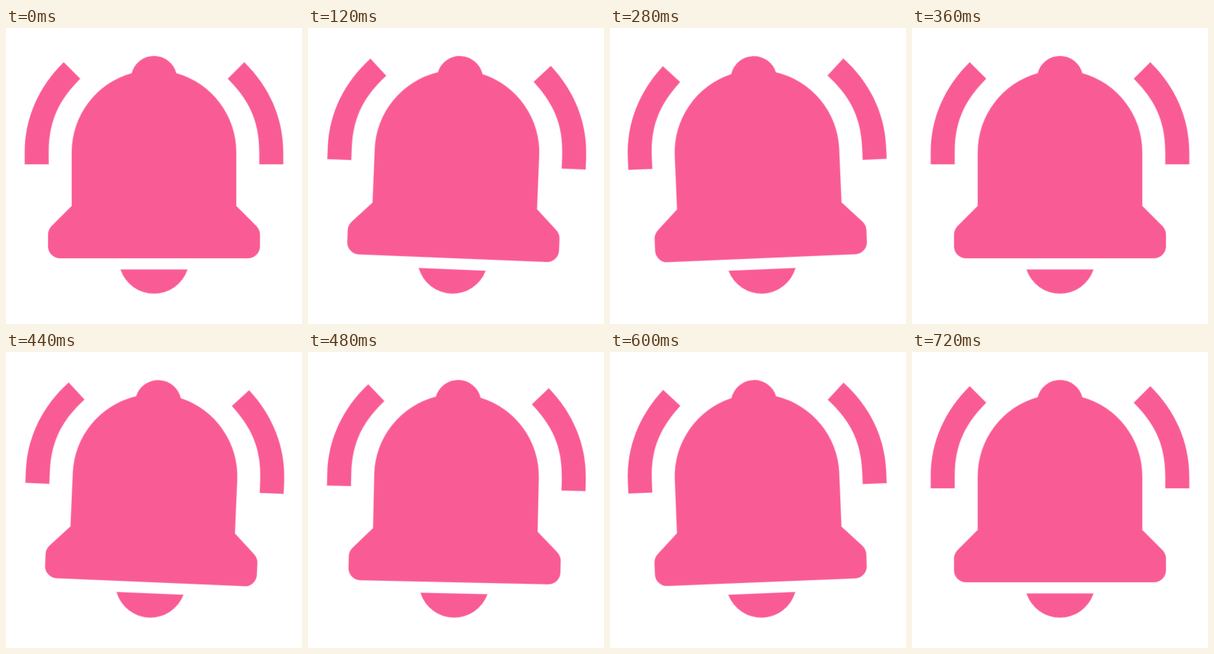
Animation, 400 px wide and 400 px high, one loop 1.76 s. Source, as an HTML page with a canvas:

```html
<!DOCTYPE html>
<html lang="en">
<head>
<meta charset="utf-8">
<title>Ringing bell</title>
<style>
  html, body { margin: 0; width: 100%; height: 100%; overflow: hidden; background: #fff; }
  canvas { display: block; width: 100vmin; height: 100vmin; }
</style>
</head>
<body>
<canvas id="stage" width="400" height="400"></canvas>
<script>
const ctx = document.getElementById('stage').getContext('2d');
const LOOP = 1760, STEP = 40, RING = 720, SWING = RING / 5, TILT = 2.5;
const PINK = '#f95c95', EDGE = 'rgba(249, 92, 149, 0.3)';

const wave = 'M25.5 184V168C25.5 121 45 79 78 46.5L100 68.5C74 95 57.5 122 57.5 168V184Z';
const body = new Path2D(
  'M89 168A111 111 0 0 1 170 61.2A31 31 0 0 1 230 61.2A111 111 0 0 1 311 168' +
  'V240.5L337 266.5Q343 272 343 279V295A16 16 0 0 1 327 311H73' +
  'A16 16 0 0 1 57 295V279Q57 272 63 266.5L89 240.5Z');
const clapper = new Path2D('M155 326.5H245A47.5 47.5 0 0 1 155 326.5Z');
const leftWave = new Path2D(wave);
const rightWave = new Path2D();
rightWave.addPath(leftWave, new DOMMatrix([-1, 0, 0, 1, 400, 0]));
const parts = [body, clapper, leftWave, rightWave];

// Five eased swings: 0, +, -, +, -, 0
function tilt(t) {
  if (t >= RING) return 0;
  const keys = [0, TILT, -TILT, TILT, -TILT, 0];
  const i = Math.floor(t / SWING);
  const ease = (1 - Math.cos(Math.PI * (t / SWING - i))) / 2;
  return keys[i] + (keys[i + 1] - keys[i]) * ease;
}

function draw(t) {
  ctx.setTransform(1, 0, 0, 1, 0, 0);
  ctx.fillStyle = '#fff';
  ctx.fillRect(0, 0, 400, 400);
  ctx.translate(200, 200);
  ctx.rotate(tilt(t) * Math.PI / 180);
  ctx.translate(-200, -200);
  ctx.fillStyle = PINK;
  ctx.strokeStyle = EDGE;
  ctx.lineWidth = 1.5;
  for (const part of parts) {
    ctx.stroke(part);
    ctx.fill(part);
  }
}

let start;
function tick(now) {
  start ??= now;
  draw(Math.floor(((now - start) % LOOP) / STEP) * STEP);
  requestAnimationFrame(tick);
}
draw(0);
requestAnimationFrame(tick);
</script>
</body>
</html>
```
